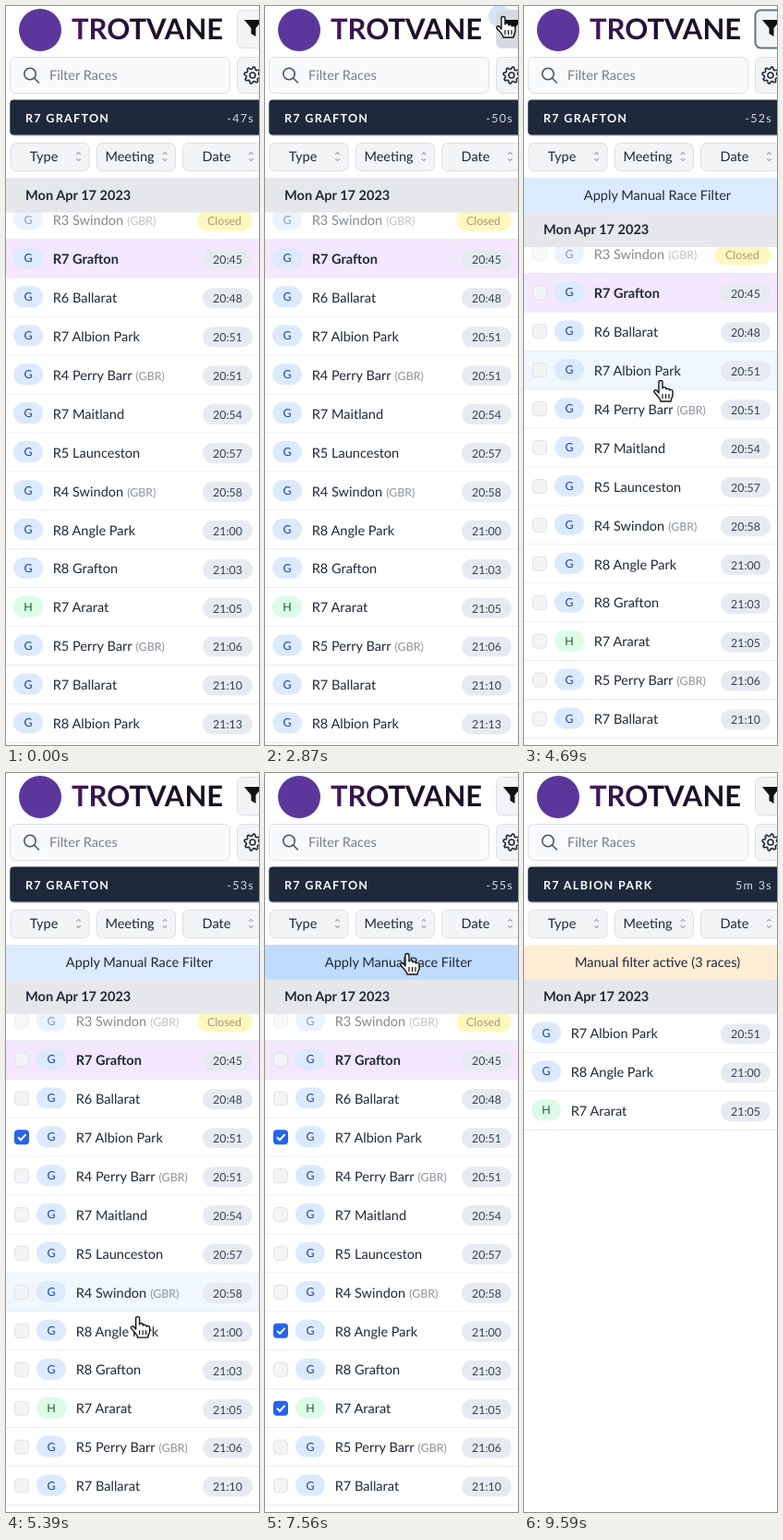
An HTML page for the animation above (9660 ms loop, 274 by 800 pixels).

```html
<!DOCTYPE html>
<html lang="en">
<head>
<meta charset="utf-8">
<title>Race list filter</title>
<style>
  html, body { margin: 0; width: 100%; height: 100%; overflow: hidden; background: #fff; }
  svg { display: block; width: 274px; height: 800px; }
  text { font: 14.55px Lato, sans-serif; fill: #1f2937; text-rendering: geometricPrecision; }
  .bold { font-weight: 700; }
  .small { font-size: 12.4px; }
  .mid { text-anchor: middle; }
  .wide { font-size: 12.6px; letter-spacing: .1em; }
  .box { fill: #f3f4f6; stroke: #dcdfe5; }
  .line { fill: none; stroke: #4b5563; stroke-width: 1.6; stroke-linecap: round; stroke-linejoin: round; }
</style>
</head>
<body>
<svg viewBox="0 0 274 800">
  <defs>
    <linearGradient id="ink">
      <stop offset="0" stop-color="#4a1763"/>
      <stop offset=".4" stop-color="#1f1030"/>
      <stop offset="1" stop-color="#17121f"/>
    </linearGradient>
  </defs>
  <g id="list"></g>
  <g id="top"></g>
  <g id="cursor">
    <path fill="#fff" stroke="#111" stroke-width="1.4" stroke-linejoin="round"
      d="M-2 1C-2-1 2-1 2 1V8C2 6 6 6 6 9C6 7.5 9.5 8 9.5 10C9.5 9 13 9 13 11V15C13 18 11 19 11 22H0C0 19-4 16-7 12C-8 10-5 9-4 10.5L-2 13Z"/>
    <path fill="none" stroke="#111" stroke-width="1.2" d="M2 14V19M5.5 14V19M9 14V19"/>
  </g>
</svg>
<script>
const LOOP = 9660, PITCH = 41.92;
const MANUAL_AT = 3000, APPLY_AT = 7700, HOVER_LAG = 65;

const races = [
  ["R3 Swindon", "Closed", "GBR"], ["R7 Grafton", "20:45"], ["R6 Ballarat", "20:48"],
  ["R7 Albion Park", "20:51"], ["R4 Perry Barr", "20:51", "GBR"], ["R7 Maitland", "20:54"],
  ["R5 Launceston", "20:57"], ["R4 Swindon", "20:58", "GBR"], ["R8 Angle Park", "21:00"],
  ["R8 Grafton", "21:03"], ["R7 Ararat", "21:05"], ["R5 Perry Barr", "21:06", "GBR"],
  ["R7 Ballarat", "21:10"], ["R8 Albion Park", "21:13"]
].map(([name, time, country]) => ({ name, time, country }));
const checkedAt = { "R7 Albion Park": 4850, "R8 Angle Park": 5650, "R7 Ararat": 6500 };

// time, x, y of the pointer's fingertip
const path = [
  [1152, 88, 830], [1874, 258, 12], [3150, 258, 12], [4200, 148, 406], [4950, 148, 406],
  [5500, 142, 610], [5750, 142, 610], [6200, 139, 685], [6750, 139, 685],
  [7400, 154, 196], [8500, 154, 196], [9400, 190, 830]
];

function pointer(t) {
  const i = path.findIndex(key => key[0] > t);
  if (i < 1) return [0, 900];
  const [t0, x0, y0] = path[i - 1], [t1, x1, y1] = path[i];
  const u = (t - t0) / (t1 - t0), e = u * u * (3 - 2 * u);
  return [x0 + (x1 - x0) * e, y0 + (y1 - y0) * e];
}

const rect = (x, y, w, h, fill, r = 0, extra = "") =>
  `<rect x="${x}" y="${y}" width="${w}" height="${h}" rx="${r}" fill="${fill}" ${extra}/>`;
const text = (x, y, str, cls = "", fill = "") =>
  `<text x="${x}" y="${y}" class="${cls}" ${fill && `style="fill:${fill}"`}>${str}</text>`;
const box = (x, y, w, h, extra = "") => rect(x + .5, y + .5, w, h, "", 6, `class="box" ${extra}`);

function checkbox(y, on) {
  return on
    ? rect(9, y - 8.5, 16, 16, "#2563eb", 4) +
      `<path d="M13 ${y - .5}l3 3 5.5-6" fill="none" stroke="#fff" stroke-width="2"/>`
    : rect(9.5, y - 8, 15, 15, "#f3f4f6", 4, 'stroke="#dfe2e7"');
}

function row(race, y, t, manual, hoverY) {
  const shift = manual ? 25 : 0, top = y - 21;
  const next = race.time === "20:45", closed = race.time === "Closed";
  const hovered = hoverY >= top && hoverY < top + PITCH;
  const harness = race.name === "R7 Ararat";
  const bg = next ? "#f3e8ff" : hovered ? "#f0f7ff" : "#fff";
  const suffix = race.country
    ? `<tspan dx="4" style="font-size:12.4px;fill:#8b919c">(${race.country})</tspan>` : "";
  return rect(0, top, 274, PITCH, bg) + rect(0, top + PITCH - 1, 274, 1, "#e9ebef") +
    `<g opacity="${closed ? .55 : 1}">` +
    (manual ? checkbox(y, t >= checkedAt[race.name]) : "") +
    rect(8 + shift, y - 12.5, 32, 23, harness ? "#dcfce7" : "#dbeafe", 11.5) +
    text(24 + shift, y + 3.5, harness ? "H" : "G", "small mid", harness ? "#166534" : "#1e40af") +
    text(50.7 + shift, y + 5.2, race.name + suffix, next ? "bold" : "") +
    (closed ? rect(207, y - 10.5, 60, 22, "#fef48a", 11) + text(236.5, y + 5.2, "Closed", "small mid", "#713f12")
            : rect(213, y - 10.5, 54, 22, "#e7ebf1", 11) + text(240, y + 5.3, race.time, "small mid", "#334155")) +
    "</g>";
}

function drawList(t, [px, py]) {
  const applied = t >= APPLY_AT, manual = t >= MANUAL_AT && !applied;
  const headY = manual || applied ? 223.5 : 186;
  const shown = applied ? races.filter(r => checkedAt[r.name]) : races;
  const firstY = applied ? 282 : manual ? 269 : 232;
  const onBanner = manual && py > 186 && py < 223;
  const hoverY = py > headY + 37 ? py : -1;
  return shown.map((r, i) => row(r, firstY + i * PITCH, t, manual, hoverY)).join("") +
    (manual ? rect(0, 186, 274, 38, onBanner ? "#bfdbfe" : "#dbeafe") +
      text(144.5, 210, "Apply Manual Race Filter", "mid") : "") +
    (applied ? rect(0, 186, 274, 38, "#ffedd5") +
      text(144.5, 210, "Manual filter active (3 races)", "mid") : "") +
    rect(0, headY, 274, 37.5, "#e5e7eb") + text(21, headY + 23.5, "Mon Apr 17 2023", "bold");
}

function gear(cx, cy) {
  const points = Array.from({ length: 32 }, (_, i) => {
    const a = (i + .5) * Math.PI / 16, r = i % 4 < 2 ? 9 : 6.8;
    return `${cx + r * Math.cos(a)},${cy + r * Math.sin(a)}`;
  });
  return `<g style="stroke:#1f2937"><polygon class="line" style="stroke:inherit" points="${points.join(" ")}"/>` +
    `<circle class="line" style="stroke:inherit" cx="${cx}" cy="${cy}" r="3"/></g>`;
}

const dropdown = (x, label, labelX, arrowX) =>
  box(x, 148, 85, 30) + text(labelX, 168, label, "mid") +
  `<path class="line" style="stroke:#a3a9b4;stroke-width:1.1" d="M${arrowX - 2} 160.5l2-2 2 2m0 5l-2 2-2-2"/>`;

function drawTop(t, [px, py]) {
  const seconds = 47 + Math.floor((t + 850) / 1000), left = 360 - seconds;
  const applied = t >= APPLY_AT;
  const focused = t >= MANUAL_AT && t < 4850;
  const hover = px > 250 && py < 44;
  const buttonStyle = focused ? 'style="stroke:#64748b;stroke-width:2"'
    : hover ? 'style="fill:#d5d9e0"' : "";
  return '<circle cx="37" cy="26" r="23" fill="#5b379b"/>' +
    `<text x="71" y="36" class="bold" style="font-size:31px;fill:url(#ink)">TROTVANE</text>` +
    (t > 2780 && t < MANUAL_AT ? '<circle cx="254" cy="11" r="12" fill="#d3e5fb"/>' : "") +
    box(250, 4, 40, 41, buttonStyle) +
    '<path d="M258 15h20l-7.5 9v9l-5-3v-6z" fill="#111"/>' +
    box(4, 55, 238, 39, 'style="fill:#f9fafb"') +
    '<circle class="line" cx="26" cy="73.5" r="6.2"/><path class="line" d="M30.5 78l5 5"/>' +
    text(47, 80, "Filter Races", "", "#777d88") +
    box(250, 55, 40, 39) + gear(267, 75) +
    rect(4.3, 103, 280, 38, "#cbd0d8", 5) + rect(4.3, 101.5, 280, 38, "#1e293b", 4) +
    text(21, 126, applied ? "R7 ALBION PARK" : "R7 GRAFTON", "bold wide", "#fff") +
    `<text x="269" y="126" text-anchor="end" class="wide" style="fill:#d5dbe4">` +
    (applied ? `${Math.floor(left / 60)}m ${left % 60}s` : `-${seconds}s`) + "</text>" +
    dropdown(4.5, "Type", 41, 78.5) + dropdown(98, "Meeting", 134, 172) + dropdown(191, "Date", 228, 265.5);
}

const layers = {};
function update(id, markup) {
  if (layers[id] === markup) return;
  document.getElementById(id).innerHTML = layers[id] = markup;
}

const cursor = document.getElementById("cursor");
function frame() {
  const t = performance.now() % LOOP, tip = pointer(t);
  update("list", drawList(t, pointer(t - HOVER_LAG)));
  update("top", drawTop(t, tip));
  cursor.setAttribute("transform", `translate(${tip})`);
  requestAnimationFrame(frame);
}
frame();
</script>
</body>
</html>
```
